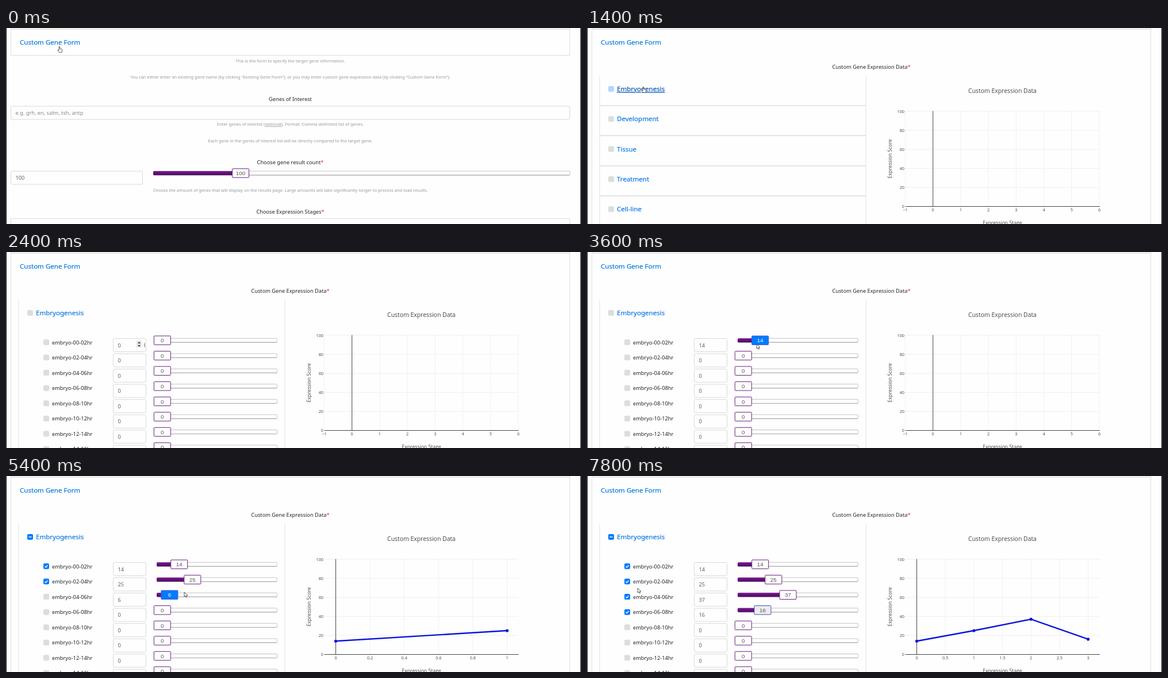
An HTML page for the animation above (8000 ms loop, 1000x341 px).

```html
<!DOCTYPE html>
<html lang="en">
<head>
<meta charset="utf-8">
<title>Custom gene form</title>
<style>
html, body { margin: 0; width: 100%; height: 100%; overflow: hidden; background: #fefefe; }
svg { display: block; width: 1000px; height: 341px; }
text { font: 9.24px "Noto Sans", "Open Sans", sans-serif; fill: #212529; white-space: pre; }
.mid { text-anchor: middle; }
.note { font-size: 7.42px; fill: #92979c; }
.link { font-size: 11.55px; font-weight: 500; fill: #0a78e2; stroke: #0a78e2; stroke-width: .2; }
.hover { fill: #0056b3; stroke: #0056b3; text-decoration: underline; }
.value { fill: #5a6068; }
.hint { fill: #83898f; }
.star { fill: #e02a3a; }
.handle { font-family: "Liberation Sans", Arial, sans-serif; font-size: 9.8px; fill: #555; }
.plot { font-family: "Open Sans", "Noto Sans", sans-serif; fill: #444; }
.tick { font-size: 7.3px; }
.axis { font-size: 8.65px; }
.title { font-size: 10.45px; }
</style>
</head>
<body>
<svg id="stage" viewBox="0 0 1000 341">
  <defs>
    <linearGradient id="purple" x2="0" y2="1">
      <stop offset="0" stop-color="#7c1696"/><stop offset="1" stop-color="#4c0a62"/>
    </linearGradient>
  </defs>
  <g id="view"></g>
</svg>
<script>
const STEP = 200, LOOP = 8000, BG = '#fefefe', LINE = '#dedede';
const view = document.getElementById('view');

// Each slider: step it is grabbed, values while dragged, step its box is ticked
const drags = [
  { grab: 16, path: [0, 7, 14], tick: 20 },
  { grab: 22, path: [0, 25], tick: 25 },
  { grab: 26, path: [0, 6, 28, 37], tick: 31 },
  { grab: 33, path: [0, 9, 16], tick: 37 }
];

// Pointer stops: step, x, y
const stops = [
  [0, 93, 32], [3, 93, 32], [6, 97, 86], [7, 98, 102], [9, 98, 103],
  [12, 241, 162], [14, 273, 153], [16, 273, 153], [18, 295, 160], [20, 69, 157],
  [22, 273, 180], [23, 323, 183], [25, 69, 183], [26, 273, 205], [27, 310, 202],
  [29, 349, 207], [31, 69, 210], [33, 275, 229], [35, 306, 233], [37, 69, 236], [39, 88, 195]
];

const clamp = v => Math.max(0, Math.min(1, v));
const ease = v => v * v * (3 - 2 * v);
const text = (x, y, s, cls = '') => `<text x="${x}" y="${y}" class="${cls}">${s}</text>`;
const rect = (x, y, w, h, fill, stroke = 'none', r = 0) =>
  `<rect x="${x}" y="${y}" width="${w}" height="${h}" rx="${r}" fill="${fill}" stroke="${stroke}"/>`;
const line = (x1, y1, x2, y2, color = LINE, w = 1) =>
  `<path d="M${x1} ${y1}L${x2} ${y2}" stroke="${color}" stroke-width="${w}"/>`;
const star = '<tspan class="star">*</tspan>';
const field = (x, y, w, s, cls = 'value') =>
  rect(x, y, w, 23, BG, '#d5d8db', 2) + text(x + 8, y + 15, s, cls);

function checkbox(x, y, state) {
  const fill = { off: '#dcdddd', down: '#b3d7ff' }[state] || '#007bff';
  const mark = {
    on: `M${x - 2.4} ${y + .1}l1.7 1.8 3.2-3.6`,
    some: `M${x - 2.6} ${y}h5.2`
  }[state] || '';
  return rect(x - 5, y - 5, 10, 10, fill, 'none', 2.2) +
    `<path d="${mark}" fill="none" stroke="#fff" stroke-width="1.4"/>`;
}

function slider(x, w, y, cx, value, mode) {
  const fill = { active: '#007bff', focus: '#ececf0' }[mode] || BG;
  const border = { active: '#4755c8', focus: '#3b50b5' }[mode] || '#692080';
  return rect(x + .5, y - 3.5, w, 7, BG, '#c4c4c4', 1.5) +
    line(x + 1, y + 3.5, x + w, y + 3.5, '#aaa') +
    (value ? rect(x, y - 3.5, cx - x, 7, 'url(#purple)', 'none', 1.5) : '') +
    rect(cx - 14.5, y - 7.7, 29, 15.4, fill, border, 1) +
    `<text x="${cx}" y="${y + 3.6}" class="handle mid"${mode === 'active' ? ' style="fill:#fff"' : ''}>${value}</text>`;
}

function geneRow(i, step) {
  const y = 157 + 26.55 * i, d = drags[i];
  let value = 0, mode = '', on = false;
  if (d && step >= d.grab) {
    const n = step - d.grab, next = drags[i + 1];
    value = d.path[Math.min(n, d.path.length - 1)];
    if (n < d.path.length) mode = 'active';
    else if (!next || step < next.grab) mode = 'focus';
    on = step >= d.tick;
  }
  const h = n => String(n).padStart(2, '0');
  return checkbox(70, y, on ? 'on' : 'off') +
    text(80, y + 3.6, `embryo-${h(2 * i)}-${h(2 * i + 2)}hr`) +
    field(186.5, y - 6.5, 57, value) +
    slider(262, 209, y - 3.3, 271.8 + 2.1 * value, value, mode);
}

function spinner() {
  return rect(227, 154.5, 9, 11.5, '#e3e3e3') +
    '<path d="M229 159l2.5-3 2.5 3zM229 162l2.5 3 2.5-3z" fill="#444"/>';
}

function chart(values) {
  const n = values.length, y0 = 310.5, yOf = v => y0 - 1.658 * v;
  let lo = -1, hi = 6, gap = 1, x0 = 553.5, x1 = 891;
  if (n === 1) { hi = 1; gap = .5; }
  if (n > 1) { lo = 0; hi = n - 1; gap = n === 2 ? .2 : .5; x0 = 573.5; x1 = 871.5; }
  const xOf = v => x0 + (x1 - x0) * (v - lo) / (hi - lo);
  let out = text(722.5, 113.3, 'Custom Expression Data', 'plot title mid');
  for (let v = 0; v <= 100; v += 20) {
    if (v) out += line(554, yOf(v), 891, yOf(v), '#eeeef0');
    out += `<text x="552" y="${yOf(v) + 2.8}" class="plot tick" text-anchor="end">${v}</text>`;
  }
  for (let k = 0; k <= Math.round((hi - lo) / gap); k++) {
    const v = +(lo + k * gap).toFixed(1), x = xOf(v);
    if (v) out += line(x, 144.5, x, y0, '#f1f1f3');
    out += text(x, 319.2, String(v).replace('-', '−'), 'plot tick mid');
  }
  out += line(554, y0, 891.5, y0, '#444') + line(xOf(0), 144.5, xOf(0), y0, '#444');
  out += text(722.5, 342, 'Expression Stage', 'plot axis mid');
  out += '<text transform="translate(530.3 227.5) rotate(-90)" class="plot axis mid">Expression Score</text>';
  if (n) {
    const pts = values.map((v, i) => [xOf(i), yOf(v)]);
    out += `<polyline points="${pts.join(' ')}" fill="none" stroke="#0a14e0" stroke-width="2.4"/>`;
    out += pts.map(([x, y]) => `<circle cx="${x}" cy="${y}" r="2.6" fill="#0a14e0"/>`).join('');
  }
  return out;
}

function lowerPage(dy) {
  return `<g transform="translate(0 ${dy})">` +
    rect(2, 47, 996, 420, BG) + line(8, 47.5, 981, 47.5) +
    text(494.5, 59.5, 'This is the form to specify the target gene information.', 'note mid') +
    text(494.5, 88, 'You can either enter an existing gene name (by clicking "Existing Gene Form"), or you may enter custom gene expression data (by clicking "Custom Gene Form").', 'note mid') +
    text(494.5, 127, 'Genes of Interest', 'mid') +
    field(8.5, 136, 972, 'e.g. grh, en, salm, tsh, antp', 'hint') +
    text(494.5, 170, 'Enter genes of interest (<tspan text-decoration="underline">optional</tspan>). Format: Comma delimited list of genes.', 'note mid') +
    text(494.5, 198.7, 'Each gene in the genes of interest list will be directly compared to the target gene.', 'note mid') +
    text(494.5, 237.3, 'Choose gene result count' + star, 'mid') +
    field(8.5, 249, 229, '100') +
    slider(256, 724.5, 252.5, 408, 100, '') +
    text(494.5, 284.5, 'Choose the amount of genes that will display on the results page. Large amounts will take significantly longer to process and load results.', 'note mid') +
    text(494.5, 323, 'Choose Expression Stages' + star, 'mid') +
    rect(8.5, 331.5, 972, 60, BG, LINE) + '</g>';
}

function categories(dy) {
  const names = ['Development', 'Tissue', 'Treatment', 'Cell-line'];
  return `<g transform="translate(0 ${dy})">` + rect(23, 135, 461.5, 400, BG) +
    names.map((s, i) => {
      const y = 135 + 52.35 * i;
      return line(22, y, 485, y, LINE, 1.5) + checkbox(42, y + 23.2, 'off') + text(52, y + 27.4, s, 'link');
    }).join('') + '</g>';
}

function pointer(step) {
  const j = Math.max(1, stops.findIndex(s => s[0] >= step));
  const [a, ax, ay] = stops[j - 1], [b, bx, by] = stops[j];
  const k = clamp((step - a) / (b - a)), x = ax + (bx - ax) * k, y = ay + (by - ay) * k;
  let d = 'M0 0V8L2 6.4 3.3 9.3 4.7 8.7 3.5 6H6Z';
  if (step < 10) d = 'M-.8 5V.8Q0-.4.8.8V4L4 4.7Q5 5 4.8 6.5L4 10.3H-.7L-3 7Q-3 5.5-1.8 6.2L-.8 7Z';
  if (step === 12 || step === 13) d = 'M0-3.5V3.5';
  return `<path transform="translate(${x} ${y})" d="${d}" fill="#fff" stroke="#333" stroke-width=".8" stroke-linejoin="round"/>`;
}

function draw(step) {
  const t = step * STEP;
  const open = 460 * ease(clamp((t - 460) / 300));
  const unfold = 400 * ease(clamp((t - 1460) / 300));
  const plotted = drags.filter(d => step >= d.tick).map(d => d.path[d.path.length - 1]);
  const box = plotted.length ? 'some' : step === 7 ? 'down' : 'off';
  let out = '';
  if (open) {
    out += text(494.5, 70.8, 'Custom Gene Expression Data' + star, 'mid');
    if (unfold) {
      for (let i = 0; i < 8; i++) out += geneRow(i, step);
      if (step > 10 && step < 14) out += spinner();
    }
    out += checkbox(42, 106, box) +
      text(52, 110.2, 'Embryogenesis', step > 6 && step < 10 ? 'link hover' : 'link');
    if (unfold < 400) out += categories(unfold);
    out += line(22, 82, 22, 341, '#e2e2e2') + line(485, 82, 485, 341, '#e2e2e2') + chart(plotted);
  }
  if (open < 460) out += lowerPage(open);
  const edge = Math.min(341, 47.5 + open);
  out += line(8, 1.7, 981, 1.7, LINE, 1.5) +
    line(8.5, 0, 8.5, edge) + line(980.5, 0, 980.5, edge) +
    text(24, 29.2, 'Custom Gene Form', step > 0 && step < 5 ? 'link hover' : 'link') +
    line(.5, 0, .5, 341, '#111') + line(999.5, 0, 999.5, 341, '#111') +
    pointer(step);
  view.innerHTML = out;
}

let shown = -1;
function tick() {
  const step = Math.floor(performance.now() % LOOP / STEP);
  if (step !== shown) draw(shown = step);
  requestAnimationFrame(tick);
}
tick();
</script>
</body>
</html>
```
